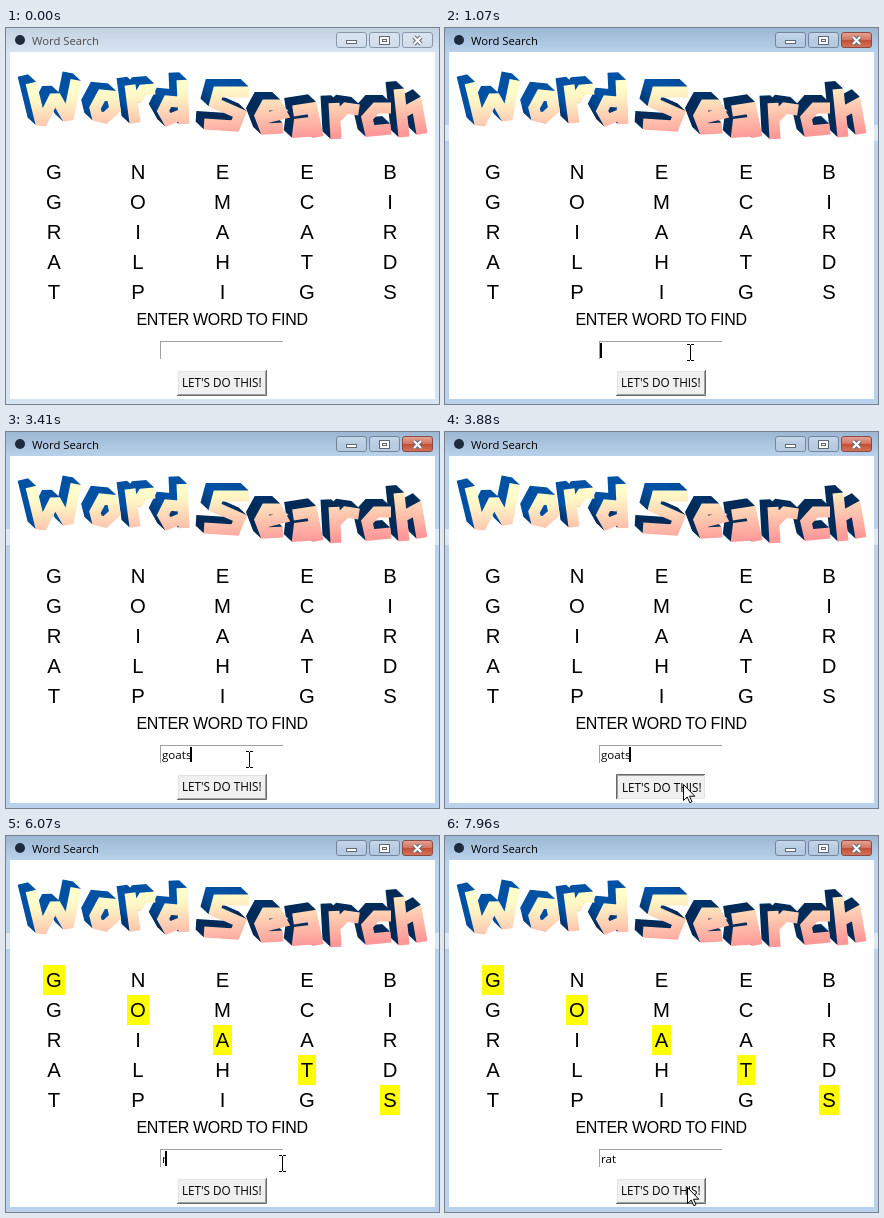
Animation of 433 by 376 pixels, one loop 8000 ms. Source, as an HTML page:

```html
<!DOCTYPE html>
<html lang="en">
<head>
<meta charset="utf-8">
<title>Word Search</title>
<style>
  html, body { margin: 0; width: 100%; height: 100%; overflow: hidden; background: #fff; }
  svg { display: block; width: 433px; height: 376px; }
  .ui { font-family: "Open Sans", "Noto Sans", sans-serif; }
  .sans { font-family: "Liberation Sans", Arial, sans-serif; text-anchor: middle; }
</style>
</head>
<body>
<svg viewBox="0 0 433 376">
  <defs>
    <linearGradient id="barIdle" x2="0" y2="1">
      <stop stop-color="#c3d2e2"/><stop offset="1" stop-color="#d7e4f2"/>
    </linearGradient>
    <linearGradient id="barActive" x2="0" y2="1">
      <stop stop-color="#9cb7d4"/><stop offset="1" stop-color="#b9d1ea"/>
    </linearGradient>
    <linearGradient id="btnIdle" x2="0" y2="1">
      <stop stop-color="#dbe5f0"/><stop offset="1" stop-color="#cfdcea"/>
    </linearGradient>
    <linearGradient id="btnActive" x2="0" y2="1">
      <stop stop-color="#c6d7e9"/><stop offset=".5" stop-color="#b8cce2"/><stop offset="1" stop-color="#b4cae2"/>
    </linearGradient>
    <linearGradient id="btnClose" x2="0" y2="1">
      <stop stop-color="#e3a697"/><stop offset=".48" stop-color="#d37562"/>
      <stop offset=".52" stop-color="#c44d34"/><stop offset="1" stop-color="#d4765f"/>
    </linearGradient>
    <linearGradient id="face" gradientUnits="userSpaceOnUse" x1="216" y1="54" x2="219" y2="113">
      <stop stop-color="#ffffcc"/><stop offset=".2" stop-color="#fff3c4"/><stop offset="1" stop-color="#ff9999"/>
    </linearGradient>
    <linearGradient id="side" gradientUnits="userSpaceOnUse" x1="216" y1="60" x2="220" y2="84">
      <stop stop-color="#0050a4"/><stop offset="1" stop-color="#002a57"/>
    </linearGradient>
    <g id="lettering" fill="none" stroke-width="11" stroke-miterlimit="2"></g>
  </defs>

  <rect id="frame" width="433" height="376"/>
  <rect id="bar" width="433" height="24"/>
  <g id="sheen" fill="#dce8f4"><rect y="97" width="4" height="16"/><rect x="429" y="97" width="4" height="16"/></g>
  <rect x="4" y="24" width="425" height="347" fill="#fff"/>
  <circle cx="14" cy="12" r="5" fill="#1d2b3c"/>
  <text id="title" class="ui" x="26" y="17" font-size="11.3">Word Search</text>
  <g id="chrome">
    <rect x="330.5" y="4.5" width="30" height="15" rx="2.5"/>
    <rect x="363.5" y="4.5" width="30" height="15" rx="2.5"/>
    <rect id="close" x="396.5" y="4.5" width="30" height="15" rx="2.5"/>
  </g>
  <g fill="#fff" stroke="#5d6979">
    <rect x="340.5" y="12.5" width="10" height="3"/>
    <rect x="373.5" y="8.5" width="10" height="8"/>
    <rect x="376.5" y="11.5" width="4" height="2"/>
  </g>
  <path d="M408 9l7 7M415 9l-7 7" stroke="#5d6979" stroke-width="4.2"/>
  <path d="M408 9l7 7M415 9l-7 7" stroke="#fff" stroke-width="2.2"/>

  <g id="banner"></g>
  <g id="marks" fill="#ff0"></g>
  <g id="grid" class="sans" font-size="20.3"></g>
  <text class="sans" x="216" y="297" font-size="16" letter-spacing="-.33">ENTER WORD TO FIND</text>

  <path d="M154.5 331V314M154 313.5H277" fill="none" stroke="#a0a0a0"/>
  <text id="entry" class="ui" x="156" y="327" font-size="11.6"></text>
  <rect id="caret" y="315" width="2" height="15"/>

  <rect x="171" y="342" width="90" height="26" fill="#f0f0f0"/>
  <g id="bevel" fill="none">
    <path d="M171.5 367V342.5H260"/>
    <path d="M172.5 366V343.5H259"/>
    <path d="M172 366.5H259.5V343"/>
    <path d="M171 367.5H260.5V342"/>
  </g>
  <text id="label" class="ui" font-size="11.7">LET'S DO THIS!</text>

  <path id="arrow" d="M.5.5V16.5L4.2 13L6.8 18.7L9 17.7L6.5 12.2H11.8Z" fill="#fff" stroke="#000"/>
  <path id="beam" d="M-3-7.5H0M1-7.5H4M.5-7V8M-3 8.5H0M1 8.5H4" fill="none" stroke="#000"/>
</svg>
<script>
const $ = id => document.getElementById(id);
const set = (el, attrs) => {
  for (const name in attrs) el.setAttribute(name, attrs[name]);
};
const show = (el, on) => set(el, { visibility: on ? 'visible' : 'hidden' });
const make = (parent, tag, attrs, text = '') => {
  const el = document.createElementNS('http://www.w3.org/2000/svg', tag);
  set(el, attrs);
  el.textContent = text;
  parent.append(el);
};

// Centre lines of the chunky banner letters.
const strokes = [
  'M25 55L35 96L49 68L62 91L70 52',
  'M89 80L96 67L106 68L109 81L99 90L91 88Z',
  'M124 57L129 95M130 73L137 62L149 61',
  'M176 52L178 96M172 74L162 73L157 83L162 92L174 87',
  'M243 64L212 64L209 75L234 86L229 98L198 96',
  'M256 91L276 86L271 77L260 77L254 88L259 101L277 100',
  'M287 83L306 80L312 109M308 94L293 96L292 104L308 103',
  'M328 75L330 111M331 89L340 80L353 82',
  'M385 80L370 80L361 90L364 103L385 101',
  'M393 61L398 109M398 84L411 77L416 106'
];
for (const d of strokes) make($('lettering'), 'path', { d });
for (let i = 10; i >= 0; i--) {
  make($('banner'), 'use', {
    href: '#lettering',
    transform: `translate(${-0.8 * i} ${-0.75 * i})`,
    stroke: i ? 'url(#side)' : 'url(#face)'
  });
}

const rows = ['GNEEB', 'GOMCI', 'RIAAR', 'ALHTD', 'TPIGS'];
const columns = [48, 132, 216.5, 301, 384];
const markWidths = [22, 22, 19, 18, 20];
rows.forEach((row, r) => [...row].forEach((letter, c) => {
  make($('grid'), 'text', { x: columns[c], y: 151 + 30 * r }, letter);
  if (r === c) {
    const width = markWidths[c];
    make($('marks'), 'rect', { x: Math.round(columns[c] - width / 2), y: 129 + 30 * r, width, height: 30 });
  }
}));

const LOOP = 8000, FOCUS = 1070, PRESS = 3880, RELEASE = 4190;
const typing = [
  [0, ''], [2160, 'g'], [2310, 'go'], [2470, 'goa'], [2630, 'goat'], [2780, 'goats'],
  [RELEASE, ''], [6070, 'r'], [6700, 'ra'], [6860, 'rat']
];
// Caret turns on and off alternately.
const blinks = [1070, 1690, 2000, 2630, 2940, 3570, 3880, 4350, 4660, 5320, 5600, 6230, 6540, 7170, 7480, 7960];
const pointer = [
  [0, 'none', 0, 0],
  [300, 'arrow', 316, 358], [455, 'arrow', 288, 347], [610, 'arrow', 258, 333], [760, 'beam', 245, 324],
  [3410, 'beam', 243, 327], [3570, 'arrow', 240, 343], [3720, 'arrow', 238, 351], [PRESS, 'arrow', 238, 352],
  [4350, 'arrow', 241, 345], [4500, 'arrow', 246, 326], [4660, 'arrow', 249, 313],
  [4820, 'arrow', 254, 313], [4980, 'beam', 260, 319], [5140, 'beam', 266, 320],
  [5320, 'beam', 272, 323], [5460, 'beam', 275, 326], [5600, 'beam', 276, 327],
  [7330, 'arrow', 267, 334], [7480, 'arrow', 260, 340], [7640, 'arrow', 250, 347],
  [7800, 'arrow', 244, 350], [7960, 'arrow', 242, 351]
];
const current = (keys, t) => keys.findLast(key => key[0] <= t);

function drawWindow(active) {
  set($('frame'), { fill: active ? '#b9d1ea' : '#d7e4f2' });
  set($('bar'), { fill: active ? 'url(#barActive)' : 'url(#barIdle)' });
  set($('title'), { fill: active ? '#000' : '#4c4c4c' });
  set($('chrome'), { fill: active ? 'url(#btnActive)' : 'url(#btnIdle)', stroke: active ? '#74859b' : '#8997a8' });
  set($('close'), { fill: active ? 'url(#btnClose)' : 'url(#btnIdle)', stroke: active ? '#8a4a42' : '#8997a8' });
  show($('sheen'), active);
}

function drawButton(pressed) {
  const shades = ['#fff', '#e3e3e3', '#a0a0a0', '#696969'];
  if (pressed) shades.reverse();
  [...$('bevel').children].forEach((line, i) => set(line, { stroke: shades[i] }));
  set($('label'), { x: pressed ? 177 : 176, y: pressed ? 360 : 359 });
}

function draw(t) {
  drawWindow(t >= FOCUS);
  drawButton(t >= PRESS && t < RELEASE);
  show($('marks'), t >= RELEASE);

  const word = current(typing, t)[1];
  $('entry').textContent = word;
  const width = word ? $('entry').getComputedTextLength() : 0.5;
  set($('caret'), { x: Math.floor(154.6 + width) });
  show($('caret'), blinks.filter(b => b <= t).length % 2);

  const [, kind, x, y] = current(pointer, t);
  for (const id of ['arrow', 'beam']) {
    show($(id), id === kind);
    set($(id), { transform: `translate(${x} ${y})` });
  }
}

const start = performance.now();
function tick() {
  draw((performance.now() - start) % LOOP);
  requestAnimationFrame(tick);
}
tick();
</script>
</body>
</html>
```
